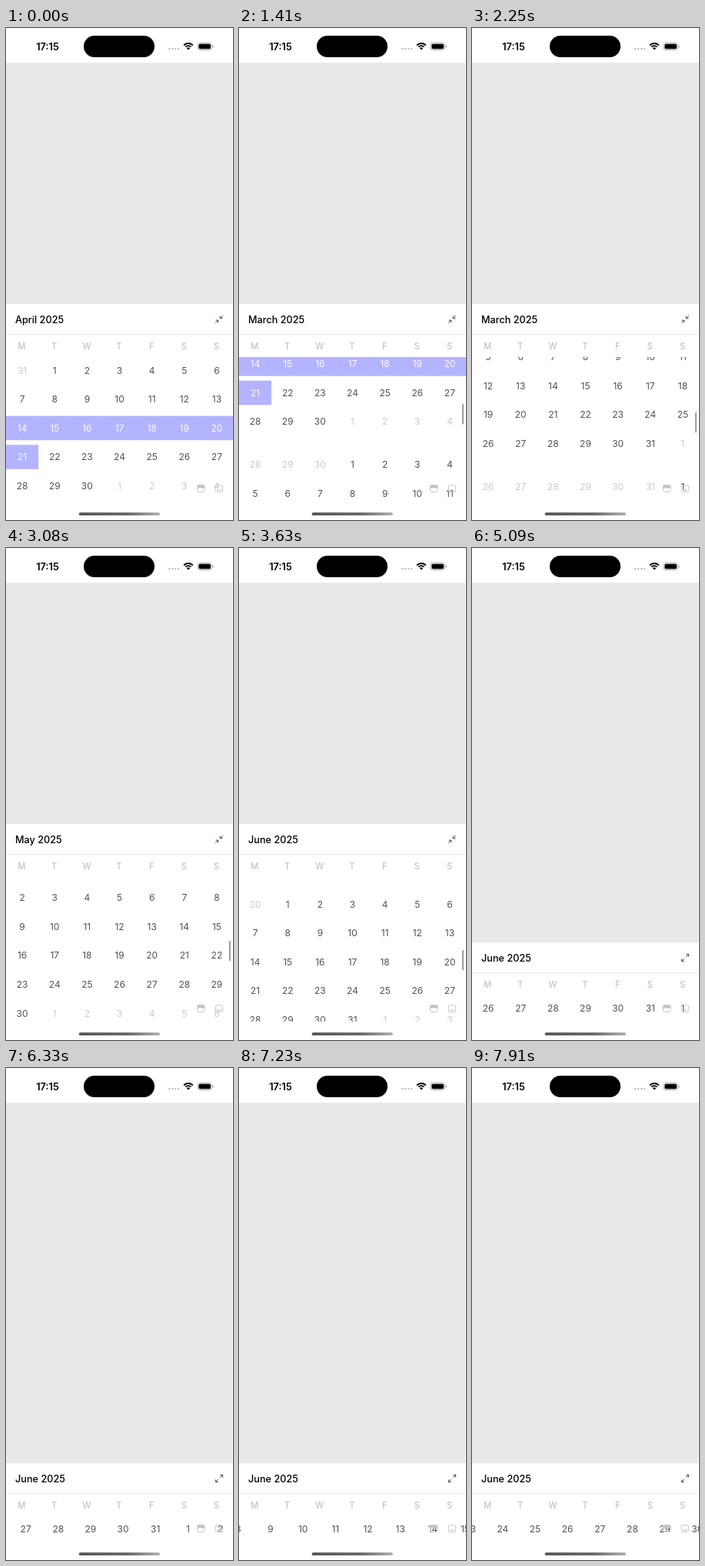
An HTML page with a canvas that plays this animation: 295 px wide and 640 px high, repeating every 8000 ms.

```html
<!DOCTYPE html>
<html lang="en">
<head>
<meta charset="utf-8">
<title>Calendar sheet</title>
<style>
  html, body { margin: 0; width: 100%; height: 100%; overflow: hidden; background: #fff; }
  canvas { display: block; width: 295px; height: 640px; }
</style>
</head>
<body>
<canvas id="stage"></canvas>
<script>
const W = 295, H = 640, LOOP = 8000;
const COL = W / 7, ROW = 37.6, GAP = 18, DAY = 864e5;
const OPEN_TOP = 359, WEEK_TOP = 514, LIST_END = 616;
const JUNE_OFFSET = 412;
const FONT = 'Inter, "Liberation Sans", sans-serif';
const INK = '#505050', PALE = '#cacaca', MARK = '#b3b3ff';

const canvas = document.getElementById('stage');
const ctx = canvas.getContext('2d');
const dpr = window.devicePixelRatio || 1;
canvas.width = W * dpr;
canvas.height = H * dpr;

// The screen refreshes in bursts: [start, end, steps]
const BURSTS = [
  [0, 0, 1], [500, 500, 1], [840, 840, 1], [1290, 1850, 6], [2140, 2790, 7],
  [3080, 3630, 6], [4640, 4640, 1], [4860, 5090, 3], [6330, 7010, 7], [7230, 7910, 7]
];

function lastTick(t) {
  const [start, end, steps] = BURSTS.filter(b => b[0] <= t).pop();
  if (steps === 1) return start;
  const gap = (end - start) / (steps - 1);
  return start + gap * Math.min(steps - 1, Math.floor((t - start) / gap + 1e-6));
}

const glide = (from, to, start, tau, t) => to + (from - to) * Math.exp(-(t - start) / tau);

function monthScroll(t) {
  if (t < 500) return 0;
  if (t < 840) return -1;
  if (t < 1290) return -6;
  if (t < 1400) return 22;
  if (t < 2140) return glide(83.5, 137, 1402, 100, t);
  if (t < 2245) return 175;
  if (t < 3080) return glide(260.7, 400, 2248, 170, t);
  if (t < 3185) return 440;
  if (t < 4640) return glide(525, 638.7, 3190, 95, t);
  return JUNE_OFFSET;
}

function weekScroll(t) {
  if (t < 6330) return 0;
  if (t < 6440) return 37.6;
  if (t < 7230) return glide(150, 520, 6443, 170, t);
  if (t < 7340) return 570;
  return glide(750, 1227.5, 7343, 190, t);
}

function sheetTop(t) {
  return t < 4860 ? OPEN_TOP : Math.round(glide(OPEN_TOP, WEEK_TOP, 4800, 58, t));
}

function title(t) {
  const month = t < 840 ? 'April' : t < 2460 ? 'March' : t < 3185 ? 'May' : 'June';
  return month + ' 2025';
}

// Weeks of each month, with their place in the scrolling list
const weeks = [];
let listY = 0;
for (let month = 3; month <= 6; month++) {
  const first = Date.UTC(2025, month, 1);
  const last = Date.UTC(2025, month + 1, 0);
  const lead = (new Date(first).getUTCDay() + 6) % 7;
  for (let day = first - lead * DAY; day <= last; day += 7 * DAY) {
    weeks.push({ month, day, y: listY });
    listY += ROW;
  }
  listY += GAP;
}

function text(str, x, y, size, weight, color, align = 'center') {
  ctx.font = `${weight} ${size}px ${FONT}`;
  ctx.textAlign = align;
  ctx.fillStyle = color;
  ctx.fillText(str, x, y + size * 0.364);
}

function rect(x, y, w, h, color) {
  ctx.fillStyle = color;
  ctx.fillRect(x, y, w, h);
}

function pill(x, y, w, h, r, color) {
  ctx.beginPath();
  ctx.roundRect(x, y, w, h, r);
  ctx.fillStyle = color;
  ctx.fill();
}

function frame(x, y, w, h, r, color) {
  ctx.beginPath();
  ctx.roundRect(x, y, w, h, r);
  ctx.strokeStyle = color;
  ctx.lineWidth = 1;
  ctx.stroke();
}

function lines(color, width, ...paths) {
  ctx.beginPath();
  for (const p of paths) {
    ctx.moveTo(p[0], p[1]);
    for (let i = 2; i < p.length; i += 2) ctx.lineTo(p[i], p[i + 1]);
  }
  ctx.strokeStyle = color;
  ctx.lineWidth = width;
  ctx.stroke();
}

function statusBar() {
  text('17:15', 54, 24, 12.8, 600, '#000');
  pill(101, 10, 92, 28, 14, '#000');
  for (let i = 0; i < 4; i++) pill(211.2 + i * 3.9, 26, 2.3, 2.3, 1.15, '#b5b5b5');

  ctx.strokeStyle = '#000';
  ctx.lineWidth = 1.9;
  for (const r of [8, 4.9]) {
    ctx.beginPath();
    ctx.arc(237, 28, r, -Math.PI * 0.76, -Math.PI * 0.24);
    ctx.stroke();
  }
  ctx.beginPath();
  ctx.moveTo(237, 28.4);
  ctx.arc(237, 28.4, 3, -Math.PI * 0.76, -Math.PI * 0.24);
  ctx.fillStyle = '#000';
  ctx.fill();

  frame(249, 19.5, 18.5, 9, 3, '#aaa');
  pill(250.4, 20.8, 15.7, 6.4, 1.8, '#000');
  pill(268.6, 22.5, 1.3, 3, 0.6, '#aaa');
}

function sizeIcon(y, expand) {
  const x = 277;
  const near = expand ? 4.6 : 1.2, far = expand ? 1.2 : 4.8;
  const arm = expand ? -3.2 : 3.2;
  const paths = [];
  for (const s of [1, -1]) {
    const at = (dx, dy) => [x + s * dx, y - s * dy];
    paths.push([...at(far, far), ...at(near, near)]);
    paths.push([...at(near, near + arm), ...at(near, near), ...at(near + arm, near)]);
  }
  lines('#4a4a4a', 1, ...paths);
}

function monthList(t, top) {
  const offset = monthScroll(t);
  for (const { month, day, y } of weeks) {
    const cy = top + 86.2 + y - offset;
    if (cy < top + 45 || cy > LIST_END + 20) continue;
    for (let i = 0; i < 7; i++) {
      const date = new Date(day + i * DAY);
      const n = date.getUTCDate();
      const inMonth = date.getUTCMonth() === month;
      const marked = month === 3 && inMonth && n >= 14 && n <= 21;
      if (marked) rect(i * COL, cy - 15.8, COL + (i < 6 && n < 21 ? 0.5 : 0), 31.6, MARK);
      text(n, (i + 0.5) * COL, cy, 12, 400, marked ? '#fff' : inMonth ? INK : PALE);
    }
  }
}

function weekStrip(t, top) {
  const offset = weekScroll(t);
  const start = Math.floor(offset / COL) - 1;
  for (let i = start; i < start + 10; i++) {
    const date = new Date(Date.UTC(2025, 4, 26) + i * DAY);
    text(date.getUTCDate(), (i + 0.5) * COL - offset, top + 85.5, 12, 400, INK);
  }
}

function viewIcons() {
  const c = '#c4c4c4';
  frame(248.5, 594.8, 9.5, 8.7, 2.2, c);
  pill(248, 594.3, 10.5, 4.2, [2.4, 2.4, 0, 0], c);
  frame(272.3, 594.8, 9.4, 8.7, 2.2, c);
  lines(c, 1.2, [274.3, 601, 279.7, 601]);
}

function sheet(t) {
  const top = sheetTop(t);
  rect(0, top, W, H - top, '#fff');
  text(title(t), 12, top + 20, 12.7, 500, '#000', 'left');
  sizeIcon(top + 20, t >= 4640);
  rect(0, top + 39, W, 1, '#e9e9e9');
  [...'MTWTFSS'].forEach((d, i) => text(d, 20.4 + i * 42.2, top + 54.5, 11.2, 500, '#c4c4c4'));

  ctx.save();
  ctx.beginPath();
  ctx.rect(0, top + 69, W, LIST_END - top - 69);
  ctx.clip();
  if (t < 4860) monthList(t, top);
  else weekStrip(t, top);
  ctx.restore();

  viewIcons();
  if (t >= 840 && t < 4640) {
    pill(289.8, 484 + monthScroll(t) * 0.061, 2.2, 26.5, 1.1, '#a0a0a0');
  }

  const bar = ctx.createLinearGradient(95, 0, 200, 0);
  bar.addColorStop(0, '#555');
  bar.addColorStop(0.6, '#666');
  bar.addColorStop(1, '#b0b0b0');
  pill(94.7, 630.3, 105.3, 3.8, 1.9, bar);
}

function draw() {
  const t = lastTick(performance.now() % LOOP);
  ctx.setTransform(dpr, 0, 0, dpr, 0, 0);
  rect(0, 0, W, H, '#fff');
  rect(0, 45, W, H - 45, '#e9e9e9');
  rect(294, 45, 1, H - 45, '#f4f4f4');
  statusBar();
  sheet(t);
  requestAnimationFrame(draw);
}
draw();
</script>
</body>
</html>
```
